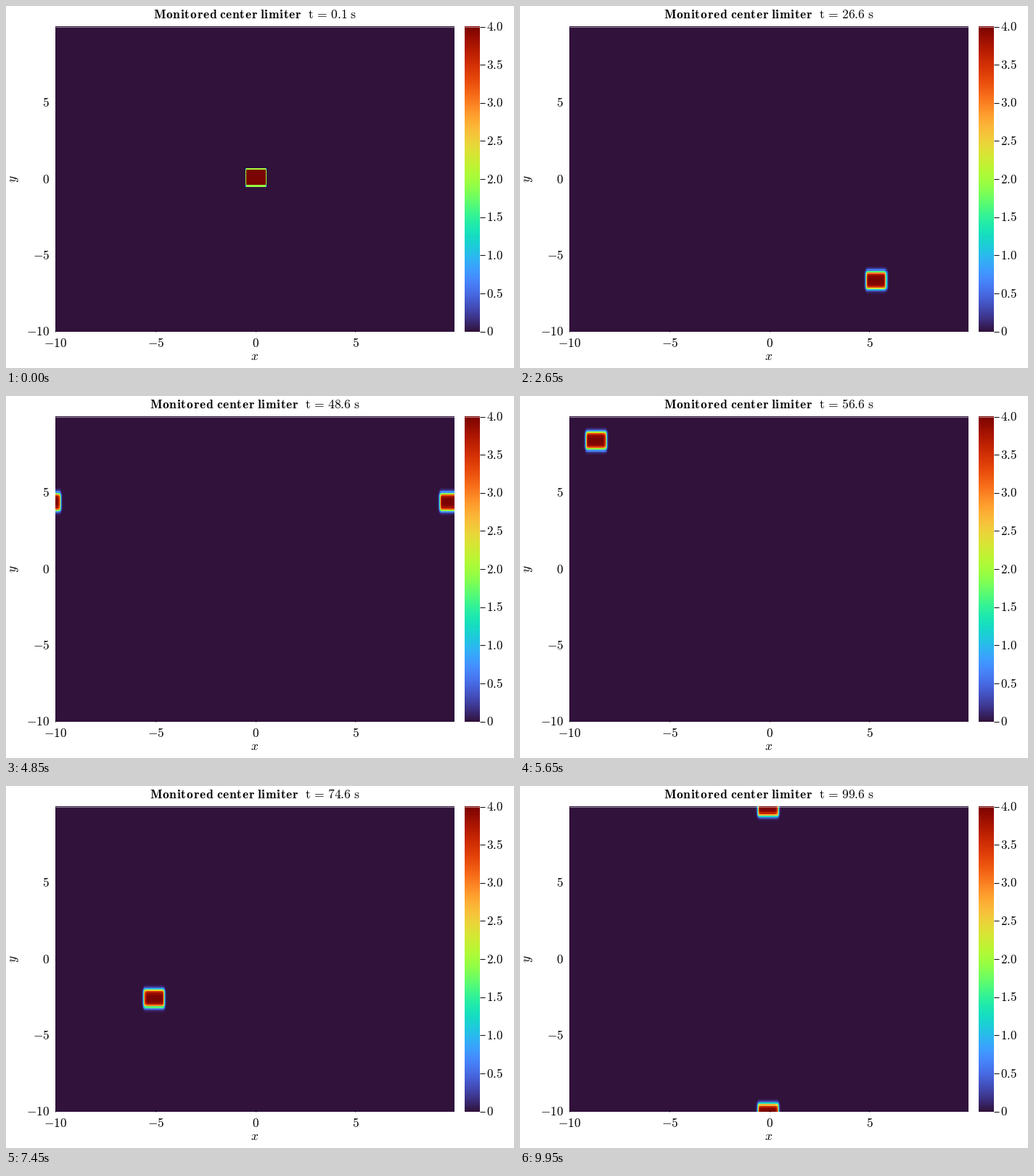
A matplotlib script that plays this animation: 700 by 500 pixels, repeating every 10000 ms.

```python
import numpy as np
import matplotlib.pyplot as plt
from matplotlib.animation import FuncAnimation
from matplotlib.lines import Line2D

W, H, DPI = 700, 500, 100
LEFT, RIGHT, TOP, BOTTOM = 68, 618, 28, 450
BAR_LEFT, BAR_RIGHT = 632, 653
X_MAX = 9.96
FRAMES, INTERVAL = 200, 50
SIZE = 12.5

plt.rcParams["mathtext.fontset"] = "cm"
fig = plt.figure(figsize=(W / DPI, H / DPI), dpi=DPI, facecolor="white")


def axes_px(x0, y0, x1, y1):
    ax = fig.add_axes([x0 / W, 1 - y1 / H, (x1 - x0) / W, (y1 - y0) / H])
    ax.axis("off")
    return ax


def label(x, y, text, ha="center", size=SIZE, **kw):
    return fig.text(x / W, 1 - y / H, text, ha=ha, fontsize=size,
                    color="black", **{"va": "baseline", **kw})


def line(x0, y0, x1, y1, width=0.7, **kw):
    style = {"color": "black", "solid_capstyle": "butt", **kw}
    fig.add_artist(Line2D([x0 / W, x1 / W], [1 - y0 / H, 1 - y1 / H],
                          lw=width, **style))


def soften(x0, x1):
    """Half-covered pixel rows at the top and bottom of a panel."""
    for y in (TOP + 0.5, BOTTOM - 0.5):
        line(x0, y, x1, y, 0.72, color="white", alpha=0.5)


def bold(word):
    return "$" + r"\hspace{0.055}".join(rf"\mathbf{{{c}}}" for c in word) + "$"


def grid(cells):
    return -10 + (np.arange(cells) + 0.5) * 20 / cells


def profile(x, center, half, width):
    """Flat-topped block with smooth edges on the periodic range [-10, 10)."""
    d = abs((x - center + 10) % 20 - 10)
    return 0.5 * (1 - np.tanh((d - half) / (2 * width)))


def px_x(v):
    return LEFT + (v + 10) * (RIGHT - LEFT) / (X_MAX + 10)


def px_y(v):
    return BOTTOM - 0.5 - (v + 10) * 421 / 20


xs, ys = grid(500), grid(200)

ax = axes_px(LEFT, TOP, RIGHT, BOTTOM)
field = ax.imshow(np.zeros((200, 500)), cmap="turbo", vmin=0, vmax=4,
                  origin="lower", extent=(-10, 10, -10, 10),
                  aspect="auto", interpolation="nearest")
ax.set_xlim(-10, X_MAX)
ax.set_ylim(-10, 10)
soften(LEFT, RIGHT)

bar = axes_px(BAR_LEFT, TOP, BAR_RIGHT, BOTTOM)
bar.imshow(np.linspace(0, 1, 256)[:, None], cmap="turbo", origin="lower",
           aspect="auto", interpolation="nearest")
soften(BAR_LEFT, BAR_RIGHT)

for v in (-10, -5, 0, 5):
    line(px_x(v), BOTTOM, px_x(v), BOTTOM - 2)
    label(px_x(v) + 0.5, 471, f"${v}$")
    label(60, px_y(v) + 5.7, f"${v}$", ha="right")

for k in range(9):
    y = BOTTOM - 0.5 - k * 421 / 8
    line(BAR_RIGHT, y, 660, y)
    label(662.5, y + 5.7, f"${k / 2}$" if k else "$0$", ha="left", size=12.2)

label(343, 489, "$x$")
label(11.5, 239, "$y$", rotation=90, va="center")

words = [(0, "Monitored"), (91.5, "center"), (148, "limiter")]
title = [(dx, label(0, 17, bold(w), ha="left")) for dx, w in words]
clock = label(0, 17, "", ha="left", size=12.6)


def update(i):
    t = 0.1 + 0.5 * i
    blur = 1 - np.exp(-t / 4)  # edges spread, then keep their width
    col = profile(xs, 0.02 + 0.2 * t, 0.5, 0.027 * blur)
    row = profile(ys, 0.05 + 0.501 * t, 0.55, 0.07 * blur)
    field.set_data(4 * np.outer(row, col))
    x0 = 202.5 if t < 10 else 198.5
    for dx, word in title:
        word.set_x((x0 + dx) / W)
    clock.set_x((x0 + 214) / W)
    clock.set_text(rf"$\mathrm{{t}}\hspace{{0.16}}=\hspace{{0.16}}{t:.1f}"
                   r"\ \mathrm{s}$")
    return [field, clock] + [word for _, word in title]


anim = FuncAnimation(fig, update, frames=FRAMES, interval=INTERVAL,
                     repeat=True, repeat_delay=0, blit=False)
plt.show()
```
